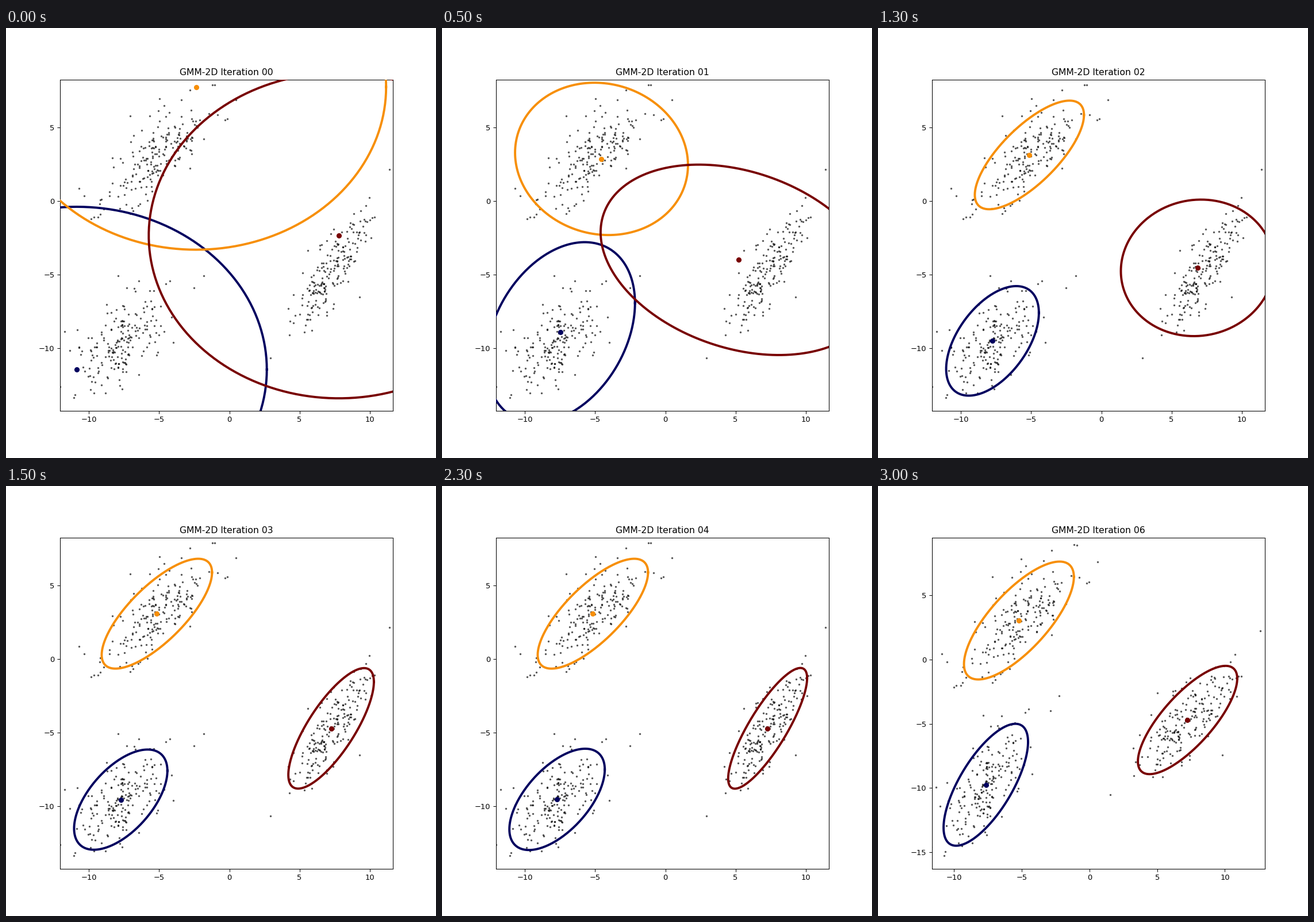
Animation of 748x748 px, one loop 3500 ms. Source, as a matplotlib script:

```python
import numpy as np
import matplotlib.pyplot as plt
from matplotlib.animation import FuncAnimation
from matplotlib.ticker import MultipleLocator

FRAMES = 7
SWITCH = 5           # iteration at which the second data set takes over
PER_CLUSTER = 200

# Axis limits (x0, x1, y0, y1) of the two data sets
LIMITS = [(-12.085, 11.663, -14.27, 8.25), (-11.656, 12.96, -16.28, 9.495)]

# start: first guess of the mean
# shapes: mean x, mean y, deviation x, deviation y, correlation per data set
# far: a few outliers that mark the edge of the cloud
CLUSTERS = [
    dict(color="#00005f", start=(-10.877, -11.47),
         shapes=[(-7.715, -9.555, 1.704, 1.727, 0.59),
                 (-7.664, -9.74, 1.563, 2.384, 0.70)],
         far=[(-2.21, -5.06), (-2.87, -5.86), (-8.05, -5.57),
              (-11.66, -9.4), (-12.07, -13.78)]),
    dict(color="#f78f08", start=(-2.376, 7.75),
         shapes=[(-5.165, 3.075, 1.971, 1.873, 0.75),
                 (-5.214, 3.048, 2.034, 2.288, 0.74)],
         far=[(0.0, 6.58), (-6.7, 6.05), (-4.87, 7.1),
              (-1.33, 7.77), (-9.95, 1.24)]),
    dict(color="#780000", start=(7.804, -2.358),
         shapes=[(7.29, -4.722, 1.41, 2.058, 0.83),
                 (7.24, -4.704, 1.839, 2.113, 0.765)],
         far=[(2.68, -11.31), (11.66, 2.65), (10.12, 0.54),
              (9.38, -6.27), (5.49, -3.65)]),
]

rng = np.random.default_rng(7)


def affine(shape):
    """Mean and triangular factor of the covariance."""
    x, y, sx, sy, rho = shape
    return np.array([x, y]), np.array([[sx, 0],
                                       [rho * sy, sy * np.sqrt(1 - rho ** 2)]])


def noise(cluster):
    """Outliers plus normal noise, scaled to zero mean and unit covariance."""
    mean, factor = affine(cluster["shapes"][0])
    far = np.linalg.solve(factor, (np.array(cluster["far"]) - mean).T).T
    core = rng.normal(size=(2 * PER_CLUSTER, 2))
    core = core[np.hypot(*core.T) < 2.6][:PER_CLUSTER - len(far)]
    z = np.vstack([far, core])
    z -= z.mean(axis=0)
    return np.linalg.solve(np.linalg.cholesky(np.cov(z.T)), z.T).T


def cloud(z, shape):
    mean, factor = affine(shape)
    return mean + z @ factor.T


def density(pts, mean, cov):
    d = pts - mean
    dist = np.sum(d @ np.linalg.inv(cov) * d, axis=1)
    return np.exp(-dist / 2) / np.sqrt(np.linalg.det(cov))


def em_step(pts, model):
    """One expectation-maximisation step on a list of (weight, mean, cov)."""
    share = np.array([w * density(pts, m, c) for w, m, c in model])
    share /= share.sum(axis=0)
    fitted = []
    for r in share:
        mean = r @ pts / r.sum()
        d = pts - mean
        fitted.append((r.mean(), mean, (d.T * r) @ d / r.sum()))
    return fitted


clouds = [noise(c) for c in CLUSTERS]
DATA = [np.vstack([cloud(z, c["shapes"][k]) for z, c in zip(clouds, CLUSTERS)])
        for k in range(2)]

spread = np.diag(DATA[0].var(axis=0))
models = [[(1 / 3, np.array(c["start"]), spread) for c in CLUSTERS]]
for step in range(1, FRAMES):
    models.append(em_step(DATA[step >= SWITCH], models[-1]))

fig, ax = plt.subplots(figsize=(8, 8), dpi=93.5)
ax.xaxis.set_major_locator(MultipleLocator(5))
ax.yaxis.set_major_locator(MultipleLocator(5))
title = ax.set_title("")

dots, = ax.plot([], [], "o", color="black", ms=2.6, mew=0, alpha=0.65)
rings = [ax.plot([], [], color=c["color"], lw=3, zorder=3)[0] for c in CLUSTERS]
means = [ax.plot([], [], "o", color=c["color"], zorder=4)[0] for c in CLUSTERS]
angle = np.linspace(0, 2 * np.pi, 361)
circle = np.array([np.cos(angle), np.sin(angle)])


def update(i):
    part = int(i >= SWITCH)
    x0, x1, y0, y1 = LIMITS[part]
    ax.set(xlim=(x0, x1), ylim=(y0, y1))
    dots.set_data(*DATA[part].T)
    for (_, mean, cov), ring, mark in zip(models[i], rings, means):
        ring.set_data(*(mean[:, None] + 2 * np.linalg.cholesky(cov) @ circle))
        mark.set_data(*mean[:, None])
    title.set_text(f"GMM-2D Iteration {i:02d}")
    return [dots, *rings, *means, title]


anim = FuncAnimation(fig, update, frames=FRAMES, interval=500,
                     repeat=True, repeat_delay=0, blit=False)
plt.show()
```
